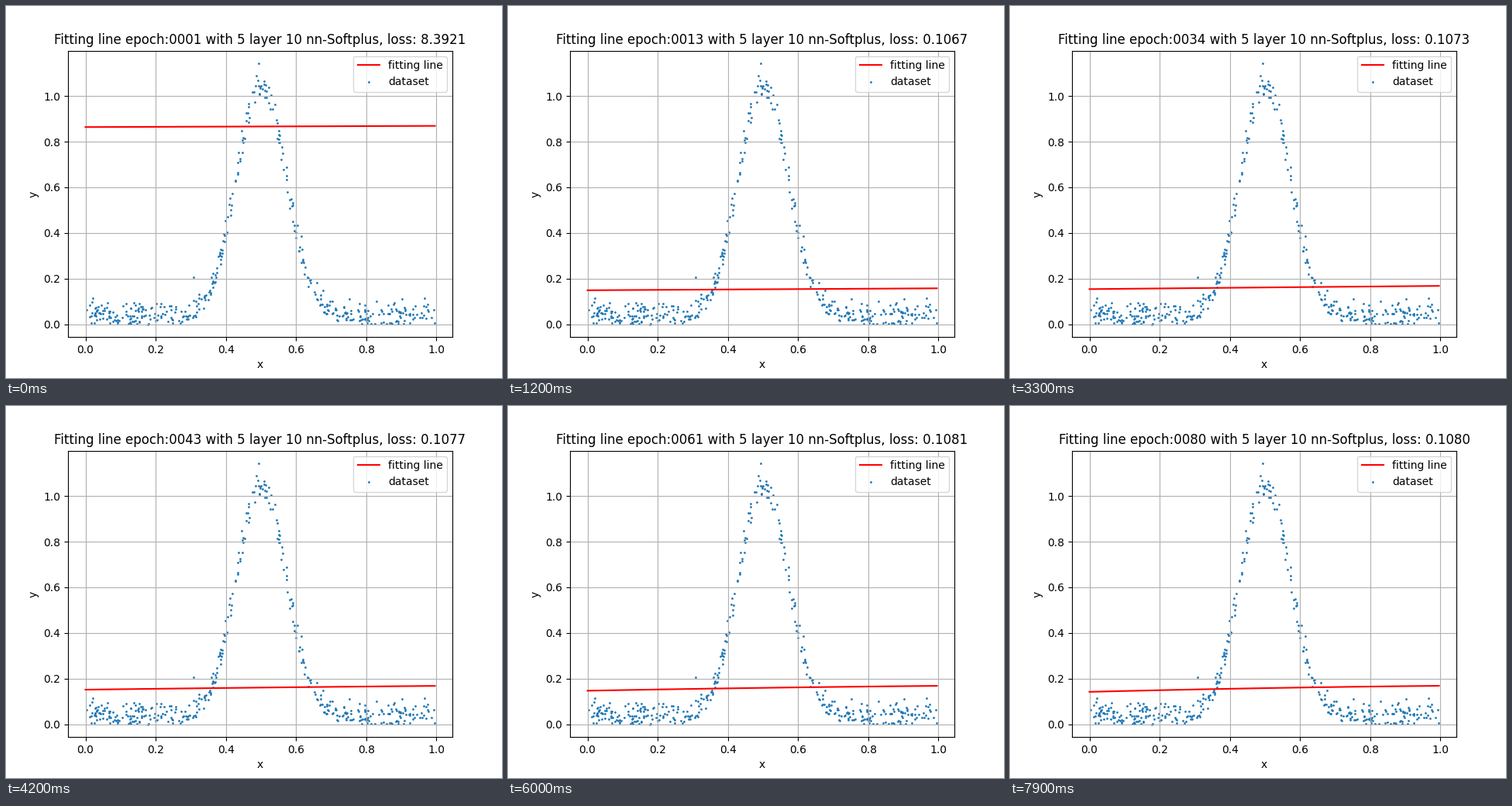
These frames come from a looping animation (640 by 480 pixels, 8 s). A matplotlib script:

```python
import numpy as np
import matplotlib.pyplot as plt
from matplotlib.animation import FuncAnimation

FRAMES = 80
POINTS = 430
X_MAX = 0.9962


def make_data():
    """Bell curve lifted by positive noise, plus two outliers."""
    rng = np.random.default_rng(11)
    x = rng.uniform(0, X_MAX, POINTS)
    noise = np.abs(rng.normal(0.04, 0.03, POINTS))
    y = np.exp(-100 * (x - 0.5) ** 2) + noise
    outliers = [(0.494, 1.142), (0.308, 0.205)]
    return np.vstack([np.column_stack([x, np.minimum(y, 1.09)]), outliers])


def fit(epoch, x):
    """Line that swings down past its level, then slowly tilts and bends."""
    t = epoch - 1
    swing = 0.702 * np.exp(-0.351 * t) * np.cos(np.pi * t / 12)
    left = 0.1625 - 0.00026 * epoch + swing
    rise = 0.005 + 0.00027 * epoch
    bulge = 0.00024 * max(0, epoch - 30)
    return left + rise * x + bulge * x * (1 - x)


def loss_at(epoch):
    plateau = np.interp(epoch, [13, 20, 34, 43, 61, 80],
                        [0.1067, 0.1066, 0.1073, 0.1077, 0.1081, 0.1080])
    return plateau + 8.2854 * np.exp(-3 * (epoch - 1) ** 0.6)


fig, ax = plt.subplots(figsize=(6.4, 4.8), dpi=100)
xs = np.linspace(0, X_MAX, 100)
line, = ax.plot(xs, fit(1, xs), color="red", label="fitting line")
ax.scatter(*make_data().T, s=1, label="dataset")
ax.set(xlim=(-0.0498, 1.0460), ylim=(-0.0566, 1.1994), xlabel="x", ylabel="y")
ax.grid()
ax.legend(loc="upper right")
title = ax.set_title("")


def update(i):
    epoch = i + 1
    line.set_ydata(fit(epoch, xs))
    title.set_text(f"Fitting line epoch:{epoch:04d} with 5 layer 10 nn-Softplus, "
                   f"loss: {loss_at(epoch):.4f}")
    return line, title


anim = FuncAnimation(fig, update, frames=FRAMES, interval=100,
                     repeat=True, repeat_delay=0, blit=False)
plt.show()
```
